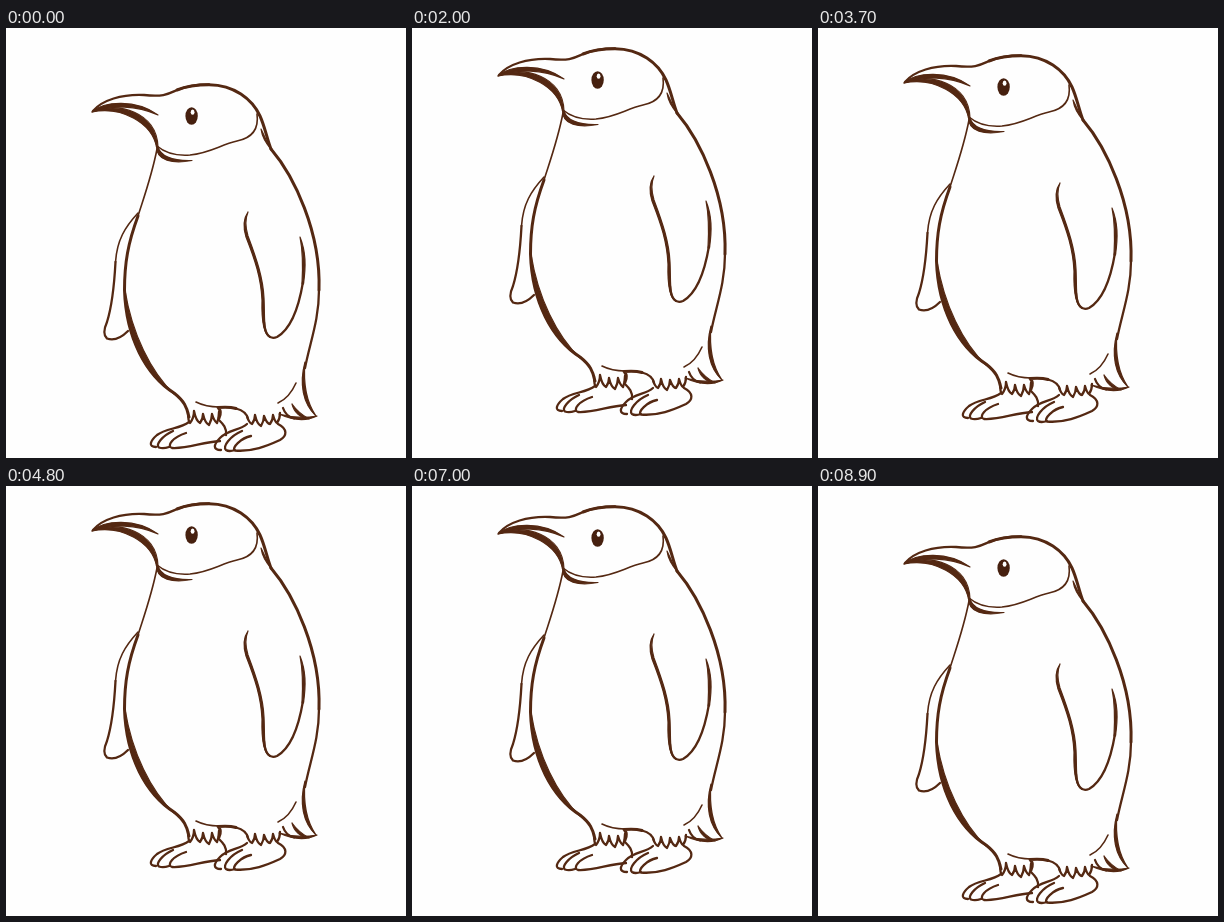
Recreate the animation shown at these times as an HTML page without scripts. Size 400 by 430 pixels, loop 9 s.

```html
<!DOCTYPE html>
<html lang="en">
<head>
<meta charset="utf-8">
<title>Hopping penguin</title>
<style>
  html, body { margin: 0; width: 100%; height: 100%; overflow: hidden; background: #fefefe; }
  svg { display: block; width: 400px; height: 430px; }
  .line { fill: none; stroke: #542812; stroke-width: 2.3; stroke-linecap: round; stroke-linejoin: round; }
  .thin { stroke-width: 1.6; }
  .bold { stroke-width: 3; }
  /* tapered strokes: out along one edge, back along the other */
  .brush { fill: #542812; stroke: #542812; stroke-width: 1.2; stroke-linejoin: round; }
</style>
</head>
<body>
<svg viewBox="0 0 400 430">
  <g>
    <!-- parabolic hop, 40px high, whole pixels at 10 steps per second -->
    <animateTransform attributeName="transform" type="translate" calcMode="discrete"
      begin="-0.02s" dur="3s" repeatCount="indefinite"
      values="0 0;0 -6;0 -10;0 -15;0 -19;0 -23;0 -26;0 -29;0 -32;0 -34;0 -36;0 -38;0 -39;0 -40;0 -40;0 -40;0 -40;0 -40;0 -39;0 -38;0 -36;0 -34;0 -32;0 -29;0 -26;0 -23;0 -19;0 -15;0 -10;0 -6"/>

    <g id="head">
      <path class="line" d="M87 83C96 72 116 66 138 67C158 69 162 66 171 62C181 58 192 56.500 203 56.500"/>
      <path class="line bold" d="M171 62C181 58 192 56.800 203 56.800C228 57 246 71 254 88C259 99 261 111 265 121"/>
      <path class="brush" d="M86 84C98 73 130 71 152 87C130 77 106 77 86 84Z"/>
      <path class="brush" d="M86 84C112 73 151 84 152 119L150.500 119C146 95 116 78 86 84Z"/>
      <path class="brush" d="M150.500 118C150 133 167 136 186 132.500C168 133 155 129 152 119Z"/>
      <path class="line thin" d="M151 118C158 124 170 128 184 127C204 125 214 117 231 113C246 110 253 101 251 86"/>
      <path class="brush" d="M255 101C256 108 260 116 266 122C261 114 258 108 255 101Z"/>
      <ellipse cx="185.600" cy="88" rx="6.200" ry="8.700" fill="#46200f"/>
      <ellipse cx="186.600" cy="84.200" rx="1.900" ry="2.600" fill="#fefefe"/>
    </g>

    <g id="body">
      <path class="line thin" d="M151 121C146 147 138 169 132 188"/>
      <path class="line bold" d="M132 188C122 215 118.500 235 118.500 262C120 310 140 347 168 365C178 373 181 379 183 389"/>
      <path class="brush" d="M119 262C120 312 140 347 168 366C145 344 126 306 119 262Z"/>
      <path class="line bold" d="M265 121C288 148 315 204 313 262"/>
      <path class="line" d="M313 262C313 292 304 314 299 340"/>
    </g>

    <g id="wings">
      <path class="line thin" d="M132 185C119 199 111 212 109.500 234"/>
      <path class="line" d="M109.500 234C108 262 106 278 101 294C97 303 98 308 101 310.500C108 313 116 309 122 303"/>
      <path class="brush" d="M242 184C239 191 239 198 242 208C251 232 257 250 258 270C259 290 257 304 264 309.500C257 306 255.500 291 256 272C255 250 249 232 240 209C237 199 237 191 242 184Z"/>
      <path class="line" d="M258 294C259 307 264 312 271 309C285 301 293 278 297 254"/>
      <path class="brush" d="M297.500 256C300 238 300 224 294 209C297 224 297 238 296 256Z"/>
    </g>

    <g id="tail">
      <path class="brush" d="M299 334C293 356 297 376 310 388C301 375 297 357 299 334Z"/>
      <path class="brush" d="M311 388C299 394 286 392 273 386C287 390 299 390 311 388Z"/>
      <path class="brush" d="M286 376C288 384 294 390 303 391C296 387 291 383 286 376Z"/>
      <path class="line" d="M277 380C279 386 282 389 288 390.500"/>
      <path class="line thin" d="M290 355C286 364 281 371 272 375"/>
    </g>

    <g id="legs">
      <path class="line thin" d="M190 374C198 378 205 379 213 379"/>
      <path class="line bold" d="M212 379.500C218 379 225 379 230 380.500M212.500 380C215 383 215 386 213 390"/>
      <path class="line" d="M230 380.500C236 382 241 386 242 391"/>
      <path class="line" d="M182 384Q182 393 184 395Q188 390 188 383Q190 393 194 395Q197 391 197 386Q199 395 203 397Q206 391 206 386Q208 393 211 395Q213 390 213 384"/>
      <path class="line" d="M241 388Q243 395 246 396Q249 392 249 387Q251 396 255 398Q258 393 258 388Q261 396 264 396Q267 392 267 387Q269 394 271 395Q274 391 274 385"/>
    </g>

    <g id="feet">
      <path class="line" d="M183 394C174 401 160 400 151 407C144 413 142 419 150 419M167 403C156 408 149 417 153 419.500Q157 421 163 419M180 405C167 409 160 418 166 420C182 421 196 414 214 413M213 392C217 396 221 400 220 407"/>
      <path class="line" d="M241 396C233 403 223 401 214 410C207 417 207 422 215 422M236 403C224 408 216 419 220 422Q223 424 229 422M245 408C235 410 225 420 229 422.500C246 424 261 418 274 412C281 408 282 401 272 396"/>
    </g>
  </g>
</svg>
</body>
</html>
```
